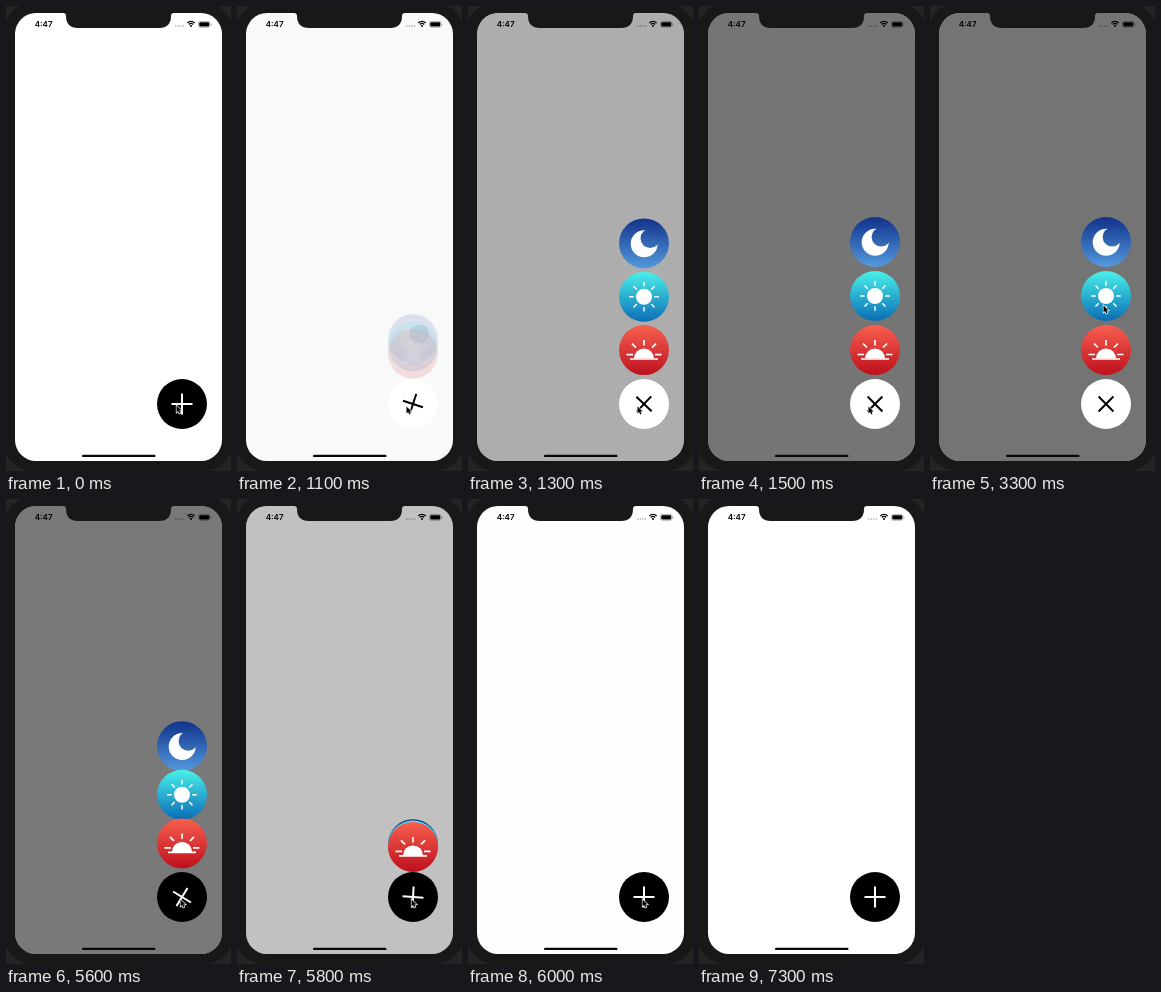
An HTML page with a canvas for the animation above (8300 ms loop, 225 px wide and 465 px high).

```html
<!DOCTYPE html>
<html lang="en">
<head>
<meta charset="utf-8">
<title>Floating menu</title>
<style>
  html, body { margin: 0; width: 100%; height: 100%; overflow: hidden; background: #1a1a1a; }
  canvas { display: block; width: 225px; height: 465px; }
</style>
</head>
<body>
<canvas id="stage"></canvas>
<script>
const W = 225, H = 465, LOOP = 8300;
const canvas = document.getElementById('stage');
const ctx = canvas.getContext('2d');
const dpr = window.devicePixelRatio || 1;
canvas.width = W * dpr;
canvas.height = H * dpr;

const OPEN = 1025, CLOSE = 5535, MOVE = 300, FADE = 500;
const CX = 176, BUTTON_Y = 398, FOLDED_Y = 348, R = 25;

const items = [
  { y: 236, top: '#10318a', bottom: '#5399dd', icon: moon, press: [4100, 4300] },
  { y: 290, top: '#4af0ea', bottom: '#0a6db6', icon: sun, press: [3400, 3500] },
  { y: 344, top: '#f8604f', bottom: '#bd0f1d', icon: sunrise, press: [2700, 2800] }
];

// cursor tip: time, x, y
const path = [
  [0, 170, 399], [900, 170, 399], [1100, 169, 400], [2300, 169, 400],
  [2600, 172, 350], [3100, 172, 350], [3300, 173, 299], [3600, 173, 299],
  [3900, 174, 236], [4450, 174, 236], [4780, 170, 394], [4850, 170, 394],
  [5100, 174, 400], [7200, 174, 400]
];

const clamp = v => Math.max(0, Math.min(1, v));
const mix = (a, b, p) => a + (b - a) * p;
const within = (t, [a, b]) => t >= a && t < b;

// cubic-bezier(.42, 0, .58, 1)
function ease(x) {
  x = clamp(x);
  let lo = 0, hi = 1, s = x;
  for (let i = 0; i < 24; i++) {
    s = (lo + hi) / 2;
    const bx = 1.26 * s * (1 - s) ** 2 + 1.74 * s * s * (1 - s) + s ** 3;
    if (bx < x) lo = s; else hi = s;
  }
  return s * s * (3 - 2 * s);
}

function progress(t, duration) {
  return t < CLOSE ? ease((t - OPEN) / duration) : 1 - ease((t - CLOSE) / duration);
}

function disc(x, y, r, fill) {
  ctx.beginPath();
  ctx.arc(x, y, r, 0, Math.PI * 2);
  ctx.fillStyle = fill;
  ctx.fill();
}

function box(x, y, w, h, r, fill) {
  ctx.beginPath();
  ctx.roundRect(x, y, w, h, r);
  ctx.fillStyle = fill;
  ctx.fill();
}

function line(x1, y1, x2, y2, color, width) {
  ctx.beginPath();
  ctx.moveTo(x1, y1);
  ctx.lineTo(x2, y2);
  ctx.strokeStyle = color;
  ctx.lineWidth = width;
  ctx.stroke();
}

function ray(angle, r1, r2, cy, width) {
  const c = Math.cos(angle), s = Math.sin(angle);
  line(c * r1, cy + s * r1, c * r2, cy + s * r2, '#fff', width);
}

function moon(fill) {
  disc(0.2, 0.3, 13.5, '#fff');
  disc(6.2, -5, 9.6, fill);
}

function sun() {
  disc(0, 0, 8, '#fff');
  for (let i = 0; i < 8; i++) ray(i * Math.PI / 4, 10.3, 14.8, 0, 1.5);
}

function sunrise() {
  ctx.beginPath();
  ctx.arc(0, 8.5, 10, Math.PI, 0);
  ctx.fillStyle = '#fff';
  ctx.fill();
  line(-14, 9, 14, 9, '#fff', 1.6);
  for (const s of [-1, 1]) {
    line(s * 11, 4.5, s * 17.5, 4.5, '#fff', 1.7);
    line(s * 8, -2.5, s * 12, -6.5, '#fff', 1.7);
  }
  line(0, -4.5, 0, -10, '#fff', 1.7);
}

function drawItem(item, y, alpha, pressed) {
  const fill = ctx.createLinearGradient(0, -R, 0, R);
  fill.addColorStop(0, item.top);
  fill.addColorStop(1, item.bottom);
  ctx.save();
  ctx.globalAlpha = alpha;
  ctx.translate(CX, y);
  disc(0, 0, R, fill);
  item.icon(fill);
  if (pressed) disc(0, 0, R, 'rgba(0,0,0,.3)');
  ctx.restore();
}

function drawItems(t) {
  if (t < OPEN || t >= CLOSE + MOVE) return;
  const p = progress(t, MOVE);
  const alpha = t < CLOSE ? p : 1;
  for (const item of items) {
    drawItem(item, mix(FOLDED_Y, item.y, p), alpha, within(t, item.press));
  }
}

function drawButton(t) {
  const open = t >= OPEN && t < CLOSE;
  const ink = open ? '#000' : '#fff';
  ctx.save();
  ctx.translate(CX, BUTTON_Y);
  disc(0, 0, R, open ? '#fff' : '#000');
  ctx.rotate(progress(t, MOVE) * Math.PI * 0.75);
  line(-10.5, 0, 10.5, 0, ink, 2);
  line(0, -10.5, 0, 10.5, ink, 2);
  if (within(t, [900, OPEN]) || within(t, [5400, CLOSE])) disc(0, 0, R, 'rgba(0,0,0,.35)');
  ctx.restore();
}

function drawStatus() {
  ctx.fillStyle = '#000';
  ctx.font = '600 8px Inter, "Liberation Sans", sans-serif';
  ctx.fillText('4:47', 28.7, 21);
  for (let i = 0; i < 4; i++) disc(169.8 + i * 2.5, 20, 0.7, '#999');

  ctx.strokeStyle = '#000';
  ctx.lineWidth = 1.3;
  for (const r of [3, 5.2]) {
    ctx.beginPath();
    ctx.arc(185, 20.6, r, -Math.PI * 0.75, -Math.PI * 0.25);
    ctx.stroke();
  }
  disc(185, 20.1, 1, '#000');

  ctx.beginPath();
  ctx.roundRect(192.5, 15.5, 11.5, 5.8, 1.7);
  ctx.strokeStyle = '#888';
  ctx.lineWidth = 0.6;
  ctx.stroke();
  box(193.3, 16.3, 9.9, 4.2, 1, '#000');
  box(204.6, 17.5, 0.8, 1.9, 0.4, '#888');
}

function drawNotch() {
  ctx.beginPath();
  ctx.moveTo(57, 6);
  ctx.lineTo(57, 7);
  ctx.quadraticCurveTo(60, 7, 60, 10);
  ctx.quadraticCurveTo(60, 22, 72, 22);
  ctx.lineTo(153, 22);
  ctx.quadraticCurveTo(165, 22, 165, 10);
  ctx.quadraticCurveTo(165, 7, 168, 7);
  ctx.lineTo(168, 6);
  ctx.closePath();
  ctx.fillStyle = '#181818';
  ctx.fill();
}

function drawCursor(t) {
  if (t >= 7200) return;
  let i = 1;
  while (i < path.length - 1 && t > path[i][0]) i++;
  const [t0, x0, y0] = path[i - 1], [t1, x1, y1] = path[i];
  const p = ease((t - t0) / (t1 - t0));
  ctx.save();
  ctx.translate(mix(x0, x1, p), mix(y0, y1, p));
  ctx.beginPath();
  ctx.moveTo(0.5, 0.5);
  ctx.lineTo(0.5, 7.5);
  ctx.lineTo(2.1, 6.1);
  ctx.lineTo(3.3, 8.6);
  ctx.lineTo(4.5, 8);
  ctx.lineTo(3.4, 5.6);
  ctx.lineTo(5.6, 5.5);
  ctx.closePath();
  ctx.strokeStyle = '#fff';
  ctx.lineWidth = 1.3;
  ctx.stroke();
  ctx.fillStyle = '#000';
  ctx.fill();
  ctx.restore();
}

function draw(t) {
  ctx.setTransform(dpr, 0, 0, dpr, 0, 0);
  ctx.fillStyle = '#242424';
  ctx.fillRect(0, 0, W, H);
  box(-2, -3, 229, 468, 29, '#181818');

  ctx.save();
  ctx.beginPath();
  ctx.roundRect(9, 7, 207, 448, 21);
  ctx.clip();
  ctx.fillStyle = '#fff';
  ctx.fillRect(9, 7, 207, 448);
  drawStatus();
  ctx.fillStyle = `rgba(0,0,0,${0.545 * progress(t, FADE)})`;
  ctx.fillRect(9, 7, 207, 448);
  box(76, 448.7, 73.5, 2.4, 1.2, '#080808');
  drawItems(t);
  drawButton(t);
  ctx.restore();

  drawNotch();
  drawCursor(t);
}

const start = performance.now();
function tick() {
  draw((performance.now() - start) % LOOP);
  requestAnimationFrame(tick);
}
tick();
</script>
</body>
</html>
```
